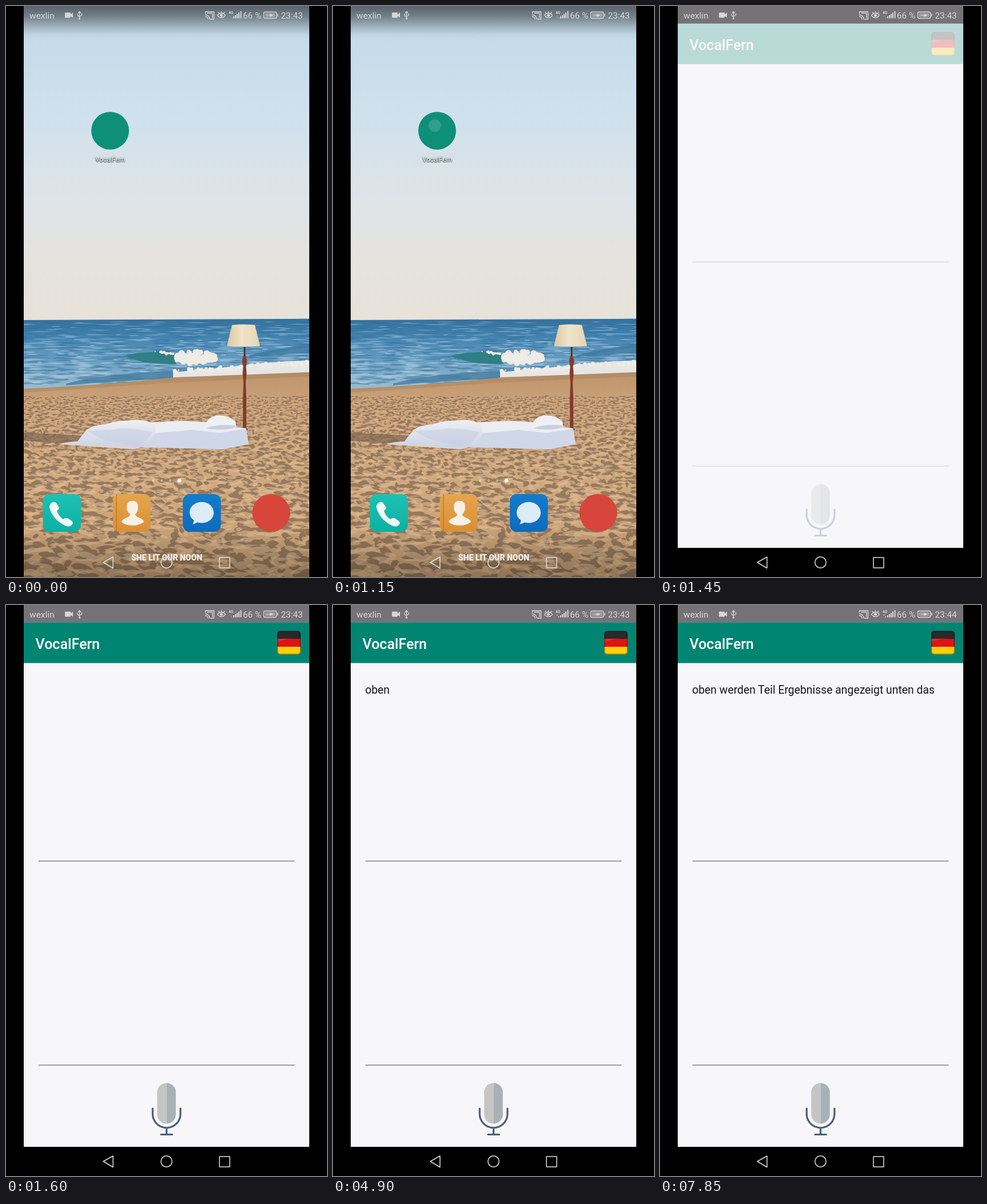
Animation, 561 px wide and 998 px high, one loop 8000 ms. Source, as an HTML page:

```html
<!DOCTYPE html>
<html lang="de">
<head>
<meta charset="utf-8">
<title>Speech app</title>
<style>
  html, body { margin: 0; width: 100%; height: 100%; overflow: hidden; background: #000; }
  svg { display: block; width: 100vw; height: 100vh; }
  text { font-family: Roboto, sans-serif; white-space: pre; }
  .line { fill: none; stroke-linecap: round; stroke-linejoin: round; }
</style>
</head>
<body>
<svg viewBox="0 0 561 998">
  <defs>
    <linearGradient id="sky" x2="0" y2="1">
      <stop offset="0" stop-color="#c1d9e8"/><stop offset=".35" stop-color="#cfe1ec"/>
      <stop offset=".62" stop-color="#dfe4e8"/><stop offset=".8" stop-color="#e5e3de"/>
      <stop offset="1" stop-color="#e7e2d9"/>
    </linearGradient>
    <linearGradient id="sea" x2="0" y2="1">
      <stop offset="0" stop-color="#33719f"/><stop offset=".25" stop-color="#4383b0"/>
      <stop offset=".6" stop-color="#6a9fc3"/><stop offset="1" stop-color="#9dc0d3"/>
    </linearGradient>
    <linearGradient id="sand" x2="0" y2="1">
      <stop offset="0" stop-color="#bd946b"/><stop offset=".13" stop-color="#c9a078"/>
      <stop offset=".5" stop-color="#d0a97f"/><stop offset="1" stop-color="#c69f75"/>
    </linearGradient>
    <linearGradient id="topShade" x2="0" y2="1">
      <stop offset="0" stop-opacity=".54"/><stop offset=".3" stop-opacity=".42"/>
      <stop offset=".6" stop-opacity=".2"/><stop offset=".85" stop-opacity=".04"/><stop offset="1" stop-opacity="0"/>
    </linearGradient>
    <linearGradient id="lowShade" x2="0" y2="1">
      <stop offset="0" stop-opacity="0"/><stop offset="1" stop-opacity=".28"/>
    </linearGradient>
    <linearGradient id="shade">
      <stop offset="0" stop-color="#d9c6a2"/><stop offset=".45" stop-color="#f1e4c9"/><stop offset="1" stop-color="#e6d5b2"/>
    </linearGradient>
    <linearGradient id="quilt" x2="0" y2="1">
      <stop offset="0" stop-color="#eff0f4"/><stop offset="1" stop-color="#cbd3e4"/>
    </linearGradient>
    <linearGradient id="teal" x2="0" y2="1"><stop offset="0" stop-color="#1cc2b4"/><stop offset="1" stop-color="#0cb0a4"/></linearGradient>
    <linearGradient id="amber" x2="0" y2="1"><stop offset="0" stop-color="#e6a54e"/><stop offset="1" stop-color="#da8e35"/></linearGradient>
    <linearGradient id="blue" x2="0" y2="1"><stop offset="0" stop-color="#147ccb"/><stop offset="1" stop-color="#0d6bbd"/></linearGradient>
    <filter id="soft" x="0" y="0" width="1" height="1"><feGaussianBlur stdDeviation=".7"/></filter>
    <clipPath id="flagBox"><rect x="474" y="45.5" width="41" height="41" rx="5"/></clipPath>
    <clipPath id="screen"><rect x="31" width="499" height="998"/></clipPath>
  </defs>

  <g id="home" clip-path="url(#screen)">
    <rect x="31" width="499" height="555" fill="url(#sky)"/>
    <g filter="url(#soft)">
      <path d="M0 549L561 546.500V672H0z" fill="url(#sea)"/>
      <path id="seaDark" fill="#285f8c" opacity=".4"/>
      <path id="seaLight" fill="#c3dbe8" opacity=".45"/>
      <path d="M425 611q50-13 105-20v16q-50 1-105 7z" fill="#3d789f" opacity=".75"/>
      <path d="M205 612q20-7 50-7 12-3 30-2l12 6v17q-45 0-65-6-12-3-27-8z" fill="#2f7f84"/>
      <path d="M105 660q60-17 195-23v14q-100 4-195 12z" fill="#447c9f" opacity=".8"/>
      <path d="M292 640q50-4 105-10 60-8 140-11v21q-110 6-245 11z" fill="#e6e6e5"/>
      <path id="foam" fill="#efebe5"/>
      <path d="M0 670q150-5 297-21l264-10v371H0z" fill="url(#sand)"/>
      <path d="M0 670q150-5 297-21l264-10v7L297 658 0 678z" fill="#a9845f" opacity=".5"/>
      <path id="prints" fill="#765d49" opacity=".6"/>
      <path id="ridges" fill="#e6c298" opacity=".55"/>
      <path d="M31 746q50 1 106 5l-14 14q-45-1-92-6z" fill="#7c6350" opacity=".65"/>

      <path d="M386 594.500L395 557.500q20-2 40 0l9 37q-29 2-58 0z" fill="url(#shade)"/>
      <path d="M415.500 596h3v16h-3z" fill="#4b352d"/>
      <path d="M414.500 612h5l2 9-2 9 1 12-1.500 16 1 27v54h-6v-54l1-27-1.500-16 1-12-2-9z" fill="#843b2b"/>
      <path d="M412 739q5-5 10 0v3h-10z" fill="#58291f"/>
      <path d="M92 766q18-5 32-5l112 10-12 4-100-7z" fill="#d8d5d6"/>
      <path d="M240 729l70-4 38 2 72 11 4 28-47 9-147-4z" fill="#d0d7e8"/>
      <path d="M246 728l64-3 40 3 50 9 20 2-46 7-50-5-68 6z" fill="#ecedf2"/>
      <path d="M121 767q8-13 21-27 12-8 32-9 18-7 36-6 18-3 34 0 13 4 17 12 2 14-9 22-9 8-18 12-26-1-58-4-30-3-55 0z" fill="url(#quilt)"/>
      <path d="M142 742q35 0 62-4 30 1 52 7-8 13-22 23-32 0-50-7-24-5-42-19z" fill="#c6cee0" opacity=".55"/>
      <path d="M345 738q7-20 22-22 20-3 34 10l1 9q-10 5-28 5-17 2-29-2z" fill="#eff0f4"/>
      <path d="M349 738q20-8 52-5-1 5-10 6-24 3-42-1z" fill="#c9cfde"/>
    </g>

    <rect x="31" width="499" height="58" fill="url(#topShade)"/>
    <rect x="31" y="910" width="499" height="88" fill="url(#lowShade)"/>

    <circle cx="182" cy="218" r="33" fill="#0e8f77"/>
    <text x="182" y="272" font-size="11.700" text-anchor="middle" fill="#fff" style="text-shadow:0 1px 2px #000,0 0 2px #0008">VocalFern</text>
    <g fill="#fff">
      <g opacity=".4"><circle cx="257" cy="829.500" r="2.2"/><circle cx="272" cy="829.500" r="2.2"/><circle cx="287" cy="829.500" r="2.2"/></g>
      <circle cx="303" cy="829.500" r="3.2"/>
    </g>

    <rect x="64.500" y="853" width="66.500" height="66" rx="12" fill="url(#teal)"/>
    <path d="M79 869q5-5 9 0l4 6q2 4-3 7 2 9 11 15 5-4 9-1l6 4q4 4-1 8-5 3-11 0-21-10-27-31-1-5 3-8z" fill="#f3f8f7"/>
    <rect x="187" y="853" width="65.500" height="66" rx="11" fill="url(#amber)"/>
    <path d="M193 854v64" stroke="#c47a22" stroke-width="1.5"/>
    <path d="M211 876q0-11 10-11t10 11q0 8-5 12 0 4 6 6 8 3 9 8-9 6-20 6t-19-6q1-5 9-8 6-2 6-6-6-4-6-12z" fill="#f7f0e4"/>
    <rect x="309" y="853" width="66.500" height="66" rx="12" fill="url(#blue)"/>
    <path d="M342 867c12 0 21 8 21 18.500s-9 18-21 18q-4 0-8-1-3 3-8 3 3-4 2-7-7-5-7-13c0-10.500 9-18.500 21-18.500z" fill="#dcecf8"/>
    <circle cx="463.500" cy="886" r="33" fill="#d8453a"/>
    <text x="281" y="968.500" font-size="14" font-weight="800" text-anchor="middle" fill="#f4f1ec">SHE LIT OUR NOON</text>
  </g>

  <g id="win">
    <rect x="31" width="499" height="998"/>
    <rect x="31" width="499" height="30.500" fill="#757376"/>
    <rect x="31" y="30.500" width="499" height="916.500" fill="#f7f6f9"/>
    <g id="content">
      <rect x="31" y="30.500" width="499" height="71" fill="#008573"/>
      <text x="51.500" y="76.500" font-size="25" font-weight="500" fill="#fff">VocalFern</text>
      <g clip-path="url(#flagBox)">
        <rect x="474" y="45" width="41" height="15" fill="#111"/>
        <rect x="474" y="59" width="41" height="15" fill="#df1414"/>
        <rect x="474" y="73" width="41" height="14" fill="#ffcf0d"/>
        <path d="M474 45h41v14q-20-2-41 6z" fill="#fff" opacity=".1"/>
        <rect x="474.500" y="46" width="40" height="40" rx="5" fill="none" stroke="#000" stroke-opacity=".35" stroke-width="2"/>
      </g>
      <path d="M56.500 447.500H504.500M56.500 804.200H504.500" stroke="#858488" stroke-width="1.4"/>
      <text id="speech" x="56.200" y="155" font-size="19.370" fill="#161616"></text>
      <path d="M280.500 835.500a16.300 16.300 0 0 0-16.300 16.300v38.500a16.300 16.300 0 0 0 16.300 16.300z" fill="#c5c6c3"/>
      <path d="M280.500 835.500a16.300 16.300 0 0 1 16.300 16.300v38.500a16.300 16.300 0 0 1-16.300 16.300z" fill="#a9b1b7"/>
      <path class="line" d="M256.300 880v9.500a24.300 24.300 0 0 0 48.600 0V880M280.600 914v11M271 925.500h19.500" stroke="#4a6079" stroke-width="3.200"/>
    </g>
  </g>

  <circle id="touch" r="11" fill="#fff"/>

  <g id="status" fill="#d6d6d8" font-size="15.300">
    <text x="41" y="21.500" font-size="15.500">wexlin</text>
    <path d="M104 11.500h8q1 0 1 1v2l4-3v9l-4-3v2q0 1-1 1h-8q-1 0-1-1v-7q0-1 1-1z"/>
    <g class="line" stroke="#d6d6d8" stroke-width="1.300">
      <path d="M128.500 10v12M126.500 12l2-2.500 2 2.500M125 14v2.500l3.500 2.500M132.500 13.500V16l-4 2.200"/>
      <path d="M348.500 13v-3h15v13h-6M348.500 15.500a7.500 7.500 0 0 1 7.500 7.500M348.500 18.500a4.500 4.500 0 0 1 4.500 4.500M352 12.500h9v8"/>
      <path d="M369.500 16.500q7-8.500 14 0-7 8-14 0zM371 11l1.500 1.500M376.500 9.500v1.500M382 11l-1.500 1.500"/>
      <rect x="450.500" y="10.500" width="22" height="11" rx="2"/>
    </g>
    <circle cx="128.500" cy="22" r="1.700"/>
    <circle cx="376.500" cy="16.300" r="2.500"/>
    <text x="389" y="14" font-size="6.500" font-weight="700">4G</text>
    <path id="data" d="M390 18.500l1.500-2 1.500 2zM393 20l1.500 2 1.500-2z"/>
    <path d="M397 18h2v3.500h-2zM400 16h2v5.500h-2zM403 14h2v7.500h-2zM406 11.500h2v10h-2zM409.500 9h2v12.500h-2z"/>
    <text x="414" y="21.500">66 %</text>
    <path d="M452.500 12.500h18v7h-18z" opacity=".45"/>
    <path d="M455.500 16.500l6-1v-2l6 2.500-6 3v-2zM474 13.500h1.600v5H474z"/>
    <text id="clock" x="480.500" y="21.500"></text>
  </g>
  <g class="line" stroke="#dedede" stroke-width="1.500">
    <path d="M170 972.500L187 963V982.500zM373 964h18v18h-18z"/>
    <circle cx="280.500" cy="972.500" r="9.700"/>
  </g>
</svg>
<script>
const LOOP = 8000, STEP = 50;
const $ = id => document.getElementById(id);
const mix = (a, b, p) => a + (b - a) * p;

// Seeded texture for water and sand
let seed = 7;
const rnd = () => (seed = (seed * 16807) % 2147483647) / 2147483647;
const n1 = v => v.toFixed(1);
const lens = (x, y, w, h, tilt) =>
  `M${n1(x)} ${n1(y)}q${n1(w * .4)} ${n1(-h)} ${n1(w)} ${n1(tilt)}q${n1(-w * .6)} ${n1(h)} ${n1(-w)} ${n1(-tilt)}z`;
const puff = (x, y, r) => `M${n1(x - r)} ${n1(y)}a${n1(r)} ${n1(r)} 0 1 0 ${n1(2 * r)} 0a${n1(r)} ${n1(r)} 0 1 0 ${n1(-2 * r)} 0z`;

function drawWater() {
  const d = ['', ''];
  for (let y = 552; y < 662; y += 2.2)
    for (let x = 10 + rnd() * 30; x < 530; x += 18 + rnd() * 60)
      d[rnd() < .5 ? 0 : 1] += lens(x, y + rnd() * 2, 10 + rnd() * 40, 1 + (y - 550) / 45, rnd() - .5);
  $('seaDark').setAttribute('d', d[0]);
  $('seaLight').setAttribute('d', d[1]);

  let foam = '';
  for (let i = 0; i < 90; i++) {
    const p = rnd();
    foam += puff(mix(298, 366, p), 614 + (rnd() - .5) * 22 * Math.sin(.5 + 2.4 * p), 2 + rnd() * 4);
    foam += puff(mix(294, 530, p), mix(640, 623, p) + (rnd() - .5) * 7, 1 + rnd() * 2.5);
    if (i < 14) foam += puff(mix(255, 296, p), 604 + rnd() * 4, 1 + rnd() * 1.5);
  }
  $('foam').setAttribute('d', foam);
}

function drawSand() {
  let dark = '', light = '';
  for (let y = 684; y < 1004;) {
    const k = (y - 684) / 314;
    for (let x = 12 + rnd() * 15; x < 530; x += (7 + 22 * k) * (.3 + rnd() * 1.3)) {
      const w = (6 + 22 * k) * (.4 + rnd() * 1.1), h = (2.2 + 10 * k) * (.5 + rnd() * .9);
      const py = y + (rnd() - .5) * h * 1.6, tilt = (rnd() - .4) * h * 1.3;
      dark += lens(x, py, w, h, tilt);
      light += lens(x + w * (rnd() - .2), py + h * .75, w, h * .6, tilt * .6);
    }
    y += 2.6 + 6.4 * k;
  }
  $('prints').setAttribute('d', dark);
  $('ridges').setAttribute('d', light);
}

// Tables of [time, value]
const OPEN = [[1150, 0], [1200, .46], [1250, .8], [1300, .93], [1350, .985], [1400, 1]];
const FADE = [[1350, 0], [1400, .08], [1450, .25], [1500, .55], [1550, .82], [1600, 1]];
const TAP_ICON = [[900, 0], [950, .16], [1150, .14], [1250, 0]];
const TAP_MIC = [[2400, 0], [2450, .2], [2650, .2], [2800, 0]];
const WORDS = [[4900, 'oben'], [5200, ' werden'], [6650, ' Teil Ergebnisse angezeigt'], [7400, ' unten'], [7650, ' das']];

function at(table, t) {
  if (t <= table[0][0]) return table[0][1];
  for (let i = 1; i < table.length; i++) {
    const [t0, v0] = table[i - 1], [t1, v1] = table[i];
    if (t < t1) return mix(v0, v1, (t - t0) / (t1 - t0));
  }
  return table[table.length - 1][1];
}

function render(t) {
  const p = at(OPEN, t);
  const left = mix(146, 31, p), top = mix(185, 0, p);
  const sx = (mix(190, 530, p) - left) / 499, sy = (mix(208, 998, p) - top) / 998;
  $('win').setAttribute('transform', `translate(${left} ${top}) scale(${sx} ${sy}) translate(-31 0)`);
  $('win').setAttribute('visibility', p > 0 ? 'visible' : 'hidden');
  $('home').setAttribute('visibility', p < 1 ? 'visible' : 'hidden');
  $('content').setAttribute('opacity', at(FADE, t));

  const onMic = t > 2000, touch = $('touch');
  touch.setAttribute('cx', onMic ? 281 : 178);
  touch.setAttribute('cy', onMic ? 876 : 209);
  touch.setAttribute('opacity', at(onMic ? TAP_MIC : TAP_ICON, t));

  $('data').setAttribute('opacity', t < 2450 ? .3 : 1);
  $('speech').textContent = WORDS.filter(w => t >= w[0]).map(w => w[1]).join('');
  $('clock').textContent = t < 5300 ? '23:43' : '23:44';
}

drawWater();
drawSand();
render(0);
const start = performance.now();
function tick() {
  const t = (performance.now() - start) % LOOP;
  render(Math.floor(t / STEP) * STEP);
  requestAnimationFrame(tick);
}
requestAnimationFrame(tick);
</script>
</body>
</html>
```
